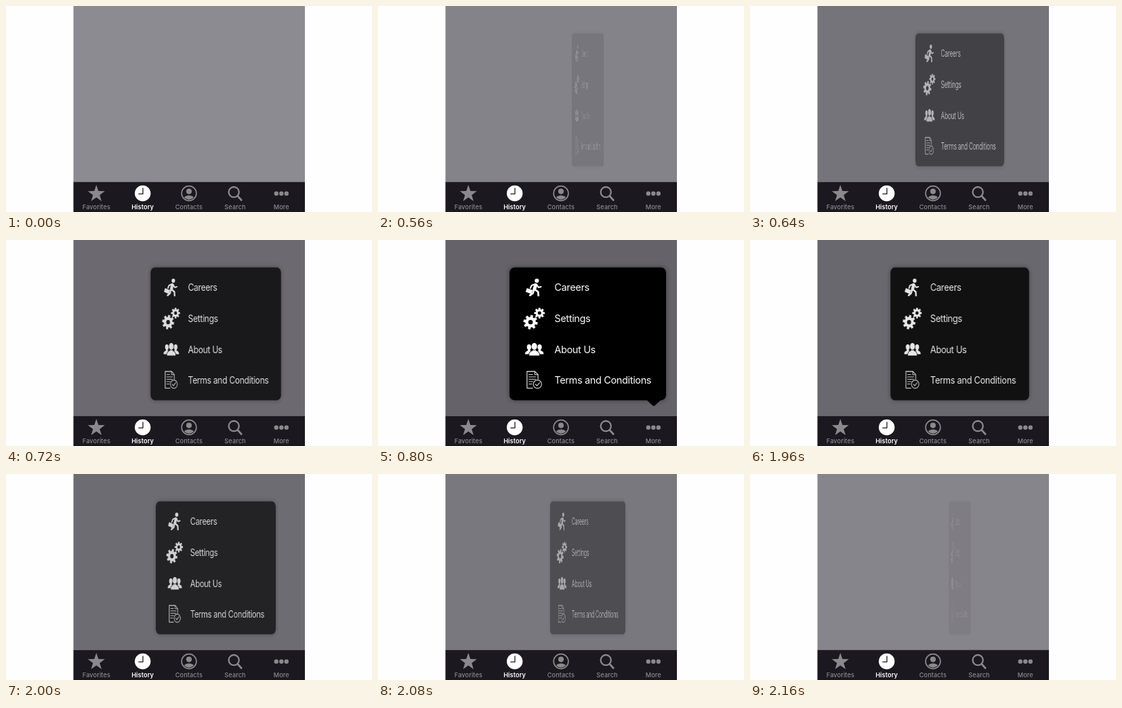
An HTML page with a canvas for the animation above (2960 ms loop, 540 by 304 pixels).

```html
<!DOCTYPE html>
<html lang="en">
<head>
<meta charset="utf-8">
<title>Popup menu</title>
<style>
html, body { margin: 0; width: 100%; height: 100%; overflow: hidden; background: #fefdff; }
canvas { display: block; }
</style>
</head>
<body>
<canvas id="stage" width="540" height="304"></canvas>
<script>
const W = 540, H = 304, LOOP = 2960, STEP = 40;
const OPEN = 560, OPENED = 800, CLOSE = 1920;
const PANEL = { x: 99.5, w: 341.5 }, BAR_Y = 259.5;
const MENU = { x: 194, y: 40.5, w: 231, h: 196, mid: 309.5 };
const GRAY = '#8b898d', BAR = '#1b191f';
const stage = document.getElementById('stage').getContext('2d');

function dot(c, x, y, r, color) {
  c.fillStyle = color;
  c.beginPath();
  c.arc(x, y, r, 0, Math.PI * 2);
  c.fill();
}

function ring(c, x, y, r, width, color) {
  c.strokeStyle = color;
  c.lineWidth = width;
  c.beginPath();
  c.arc(x, y, r, 0, Math.PI * 2);
  c.stroke();
}

function line(c, points, width, color) {
  c.strokeStyle = color;
  c.lineWidth = width;
  c.beginPath();
  points.forEach(([x, y]) => c.lineTo(x, y));
  c.stroke();
}

function shape(c, points, color) {
  c.fillStyle = color;
  c.beginPath();
  points.forEach(([x, y]) => c.lineTo(x, y));
  c.fill();
}

function label(c, text, x, y, font, color, align, spacing) {
  c.font = font + ' Inter, "Open Sans", sans-serif';
  c.letterSpacing = spacing + 'px';
  c.textAlign = align;
  c.fillStyle = color;
  c.fillText(text, x, y);
}

const polar = (x, y, r, a) => [x + r * Math.cos(a), y + r * Math.sin(a)];

function layer(draw) {
  const canvas = document.createElement('canvas');
  canvas.width = W;
  canvas.height = H;
  const c = canvas.getContext('2d');
  c.lineCap = c.lineJoin = 'round';
  draw(c);
  return canvas;
}

function drawTabs(c) {
  c.fillStyle = BAR;
  c.fillRect(PANEL.x, BAR_Y, PANEL.w, H - BAR_Y);

  const star = Array.from({ length: 10 }, (_, i) =>
    polar(133.3, 277.3, i % 2 ? 5.2 : 13.2, -Math.PI / 2 + i * Math.PI / 5));
  shape(c, star, GRAY);

  dot(c, 201.7, 276.5, 11.7, '#fff');
  line(c, [[202, 269], [202, 277.3], [195.8, 277.3]], 1.3, BAR);

  ring(c, 270, 276.5, 10.9, 1.7, GRAY);
  c.save();
  c.beginPath();
  c.arc(270, 276.5, 9.2, 0, Math.PI * 2);
  c.clip();
  c.fillStyle = GRAY;
  c.beginPath();
  c.ellipse(270, 285, 8, 5.6, 0, 0, Math.PI * 2);
  c.fill();
  c.restore();
  dot(c, 270, 273.6, 5, BAR);
  dot(c, 270, 273.6, 4.1, GRAY);

  ring(c, 336.2, 274.6, 7.6, 2.3, GRAY);
  line(c, [[342, 280.6], [347.2, 286.4]], 2.9, GRAY);

  for (const x of [398.8, 406.3, 413.8]) dot(c, x, 276.8, 3.2, GRAY);

  ['Favorites', 'History', 'Contacts', 'Search', 'More'].forEach((text, i) => {
    const active = i === 1;
    label(c, text, 133.4 + i * 68.2, 300.2, (active ? 600 : 500) + ' 9.2px',
      active ? '#fff' : GRAY, 'center', 0.1);
  });
}

function drawRunner(c) {
  dot(c, 234.3, 60, 3.1, '#fff');
  line(c, [[232.6, 66.4], [230.8, 72.4]], 5, '#fff');
  line(c, [[234, 66], [236.8, 70], [240.4, 69]], 2.1, '#fff');
  line(c, [[231.5, 65.3], [226.6, 67], [224.8, 71]], 2.1, '#fff');
  line(c, [[231.4, 73], [236.2, 76.6], [236.6, 82]], 2.7, '#fff');
  line(c, [[230, 73.5], [228.6, 78.4], [224.2, 81.6]], 2.7, '#fff');
  c.save();
  c.translate(223, 75.2);
  c.rotate(0.35);
  c.fillStyle = '#fff';
  c.fillRect(-4.6, -2.9, 9.2, 6);
  c.restore();
}

function drawGear(c, x, y, r, hole, turn) {
  const points = [];
  for (let i = 0; i < 8; i++) {
    const a = turn + i * Math.PI / 4;
    points.push(polar(x, y, r * 0.72, a - 0.26), polar(x, y, r, a - 0.17),
      polar(x, y, r, a + 0.17), polar(x, y, r * 0.72, a + 0.26));
  }
  shape(c, points, '#fff');
  dot(c, x, y, hole, '#000');
}

function drawPerson(c, x, y, size, outline) {
  c.fillStyle = '#fff';
  c.strokeStyle = '#000';
  c.lineWidth = 1.5;
  c.beginPath();
  c.moveTo(x - 7.6 * size, y + 13.5 * size);
  c.quadraticCurveTo(x - 8 * size, y + 8 * size, x - 2.2 * size, y + 6.6 * size);
  c.lineTo(x - 2.2 * size, y + 3 * size);
  c.lineTo(x + 2.2 * size, y + 3 * size);
  c.lineTo(x + 2.2 * size, y + 6.6 * size);
  c.quadraticCurveTo(x + 8 * size, y + 8 * size, x + 7.6 * size, y + 13.5 * size);
  c.closePath();
  if (outline) c.stroke();
  c.fill();
  c.beginPath();
  c.ellipse(x, y, 4.1 * size, 5.1 * size, 0, 0, Math.PI * 2);
  if (outline) c.stroke();
  c.fill();
}

function drawDocument(c) {
  const ink = '#d4d4d4';
  line(c, [[228, 218.6], [219.8, 218.6], [219.8, 194], [231.4, 194],
    [236, 198.6], [236, 206]], 1.3, ink);
  line(c, [[231.2, 194.4], [231.2, 198.8], [235.8, 198.8]], 1.1, ink);
  [198.5, 202, 205.5, 209, 212.5].forEach((y, i) =>
    line(c, [[222.6, y], [[228, 232.5, 232.5, 228.5, 227][i], y]], 1.1, ink));
  dot(c, 235.2, 212.8, 7.4, '#000');
  ring(c, 235.2, 212.8, 6.1, 1.2, ink);
  line(c, [[232.3, 213], [234.5, 215.1], [238.3, 210.6]], 1.2, ink);
}

function drawMenu(c) {
  c.fillStyle = '#000';
  c.shadowColor = 'rgba(0,0,0,0.45)';
  c.shadowBlur = 7;
  c.beginPath();
  c.roundRect(MENU.x, MENU.y, MENU.w, MENU.h, 7.5);
  c.fill();
  c.shadowColor = 'transparent';

  drawRunner(c);
  drawGear(c, 225, 121.2, 10.7, 3.3, 0.2);
  drawGear(c, 238.2, 107.8, 8, 2.5, 0);
  drawPerson(c, 222.8, 158, 0.78);
  drawPerson(c, 238.4, 158, 0.78);
  drawPerson(c, 230.6, 157, 1, true);
  drawDocument(c);

  ['Careers', 'Settings', 'About Us', 'Terms and Conditions'].forEach((text, i) =>
    label(c, text, 260.3, 75.2 + i * 45.65, '400 14.5px', '#fff', 'left', -0.35));
}

const tabs = layer(drawTabs), menu = layer(drawMenu);

// Horizontal scale of the menu, advancing in fixed steps.
function menuScale(t) {
  if (t < OPEN) return 0;
  const closing = t >= CLOSE;
  const n = Math.min(6, Math.floor((t - (closing ? CLOSE : OPEN)) / STEP));
  return closing
    ? 0.99 - 0.0971 * n - 0.00746 * n * n
    : Math.min(1, 0.203 + 0.2066 * n - 0.0123 * n * n);
}

function backdrop(s) {
  const mix = (a, b) => Math.round(a + (b - a) * s);
  return `rgb(${mix(140, 101)},${mix(139, 99)},${mix(146, 105)})`;
}

function render(now) {
  const t = now % LOOP, s = menuScale(t), c = stage;
  c.fillStyle = '#fefdff';
  c.fillRect(0, 0, W, H);
  c.fillStyle = backdrop(s);
  c.fillRect(PANEL.x, 0, PANEL.w, BAR_Y);
  c.drawImage(tabs, 0, 0);

  if (s > 0) {
    c.save();
    c.globalAlpha = Math.pow(s, 1.45);
    c.translate(MENU.mid, 0);
    c.scale(s, 1);
    c.drawImage(menu, -MENU.mid, 0);
    c.restore();
  }
  if (t >= OPENED && t < CLOSE) {
    shape(c, [[396.5, 236], [405.3, 244.4], [406.8, 245], [408.3, 244.4], [417.5, 236]], '#000');
  }
  requestAnimationFrame(render);
}

render(performance.now());
</script>
</body>
</html>
```
